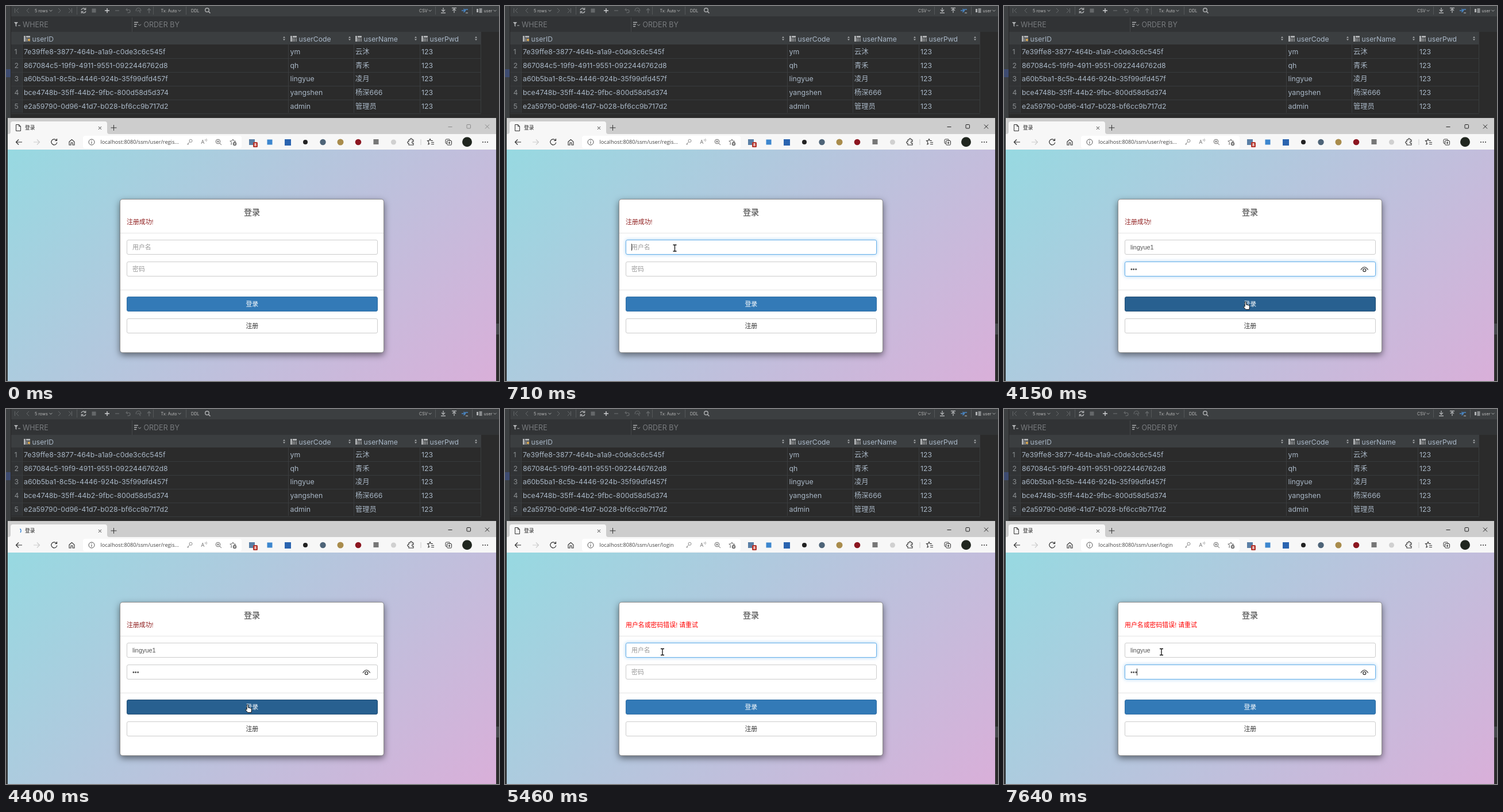
Animation of 858 by 653 pixels, one loop 8 s. Source, as an HTML page:

```html
<!DOCTYPE html>
<html lang="zh">
<head>
<meta charset="utf-8">
<title>登录</title>
<style>
  html, body { margin: 0; width: 858px; height: 653px; overflow: hidden; background: #2b2b2b; }
  body { position: relative; }
  div, svg { position: absolute; box-sizing: border-box; }
  #page { left: 3px; top: 250px; width: 850px; height: 403px; background: linear-gradient(135deg, #97d9e1, #d9afd9); }
  #modal { left: 198px; top: 336px; width: 460px; height: 268px; background: #fff; border: 1px solid rgba(0,0,0,.45); border-radius: 5px; box-shadow: 0 4px 12px rgba(0,0,0,.5); }
  .box { left: 210px; width: 437px; height: 26px; border: 1px solid #ccc; border-radius: 3px; background: #fff; }
  #name { top: 407px; }
  #pass { top: 445px; }
  #login { top: 506px; }
  #reg { top: 544px; }
  .ide { font-family: Inter, "Noto Sans CJK SC", "Noto Sans CJK", sans-serif; }
  .ui { font-family: "Open Sans", "Noto Sans CJK SC", "Noto Sans CJK", sans-serif; }
  .web { font-family: "Liberation Sans", "Noto Sans CJK SC", "Noto Sans CJK", sans-serif; }
  text { white-space: pre; }
</style>
</head>
<body>
<svg id="back" width="858" height="653"></svg>
<div id="page"></div>
<div id="modal"></div>
<div class="box" id="name"></div>
<div class="box" id="pass"></div>
<div class="box" id="login"></div>
<div class="box" id="reg"></div>
<svg id="front" width="858" height="653"></svg>
<script>
const LOOP = 8000;
const $ = id => document.getElementById(id);

const rect = (x, y, w, h, fill, extra = '') =>
  `<rect x="${x}" y="${y}" width="${w}" height="${h}" fill="${fill}" ${extra}/>`;
const dot = (x, y, r, fill) => `<circle cx="${x}" cy="${y}" r="${r}" fill="${fill}"/>`;
const line = (d, color, width = 1, extra = '') =>
  `<path d="${d}" fill="none" stroke="${color}" stroke-width="${width}" ${extra}/>`;
// yc is the vertical middle of the letters
const text = (x, yc, str, size, fill, font, extra = '') =>
  `<text x="${x}" y="${yc + size * .37}" font-size="${size}" fill="${fill}" class="${font}" ${extra}>${str}</text>`;
const chevron = (x, y, color) => line(`M${x - 2.5} ${y - 1.2}l2.5 2.5l2.5-2.5`, color, .9);

function ide() {
  const soft = '#afb1b3', dim = '#65686a', ink = '#a9b7c6';
  let s = rect(0, 0, 858, 195, '#2b2b2b') + rect(0, 0, 858, 18, '#3c3f41')
    + rect(9, 18, 849, 27, '#313335') + rect(9, 45, 818, 22, '#3b3e40') + rect(9, 67, 19, 119, '#313335')
    + rect(0, 0, 8, 653, '#3c3f41') + rect(0, 110, 8, 14, '#3d4b70') + rect(8, 0, 1, 195, '#292929')
    + rect(0, 195, 3, 458, '#35383a') + rect(853, 195, 5, 458, '#2b2b2b') + rect(853, 553, 5, 19, '#45484b');

  s += line('M15.5 4v8M22 4l-4 4l4 4M40 4l-4 4l4 4', dim) + line('M91 4l4 4l-4 4M109 4l4 4l-4 4M114.5 4v8', dim)
    + line('M131 7a4 4 0 0 1 7-1.5M139 9a4 4 0 0 1-7 1.5', soft, 1.4)
    + line('M138.8 3v3.4h-3.4M131.2 13v-3.4h3.4', soft, 1.1)
    + rect(149.5, 4.5, 7, 7, dim) + line('M172 8h8M176 4v8', '#d0d2d4', 1.4) + line('M190 8h7', dim, 1.3)
    + line('M211 4l-2 2.5l3 2M209.5 6.5h4a2.6 2.6 0 0 1 0 5.2h-2', dim, 1.2)
    + line('M226.5 9a4.2 4.2 0 1 1 8 0M229 9.5a2 2 0 1 1 4 0M232 9l2 3', dim, 1.2)
    + line('M249 12.500v-8M246 7.500l3-3l3 3', dim, 1.4)
    + line('M123.500 1v14M256.500 1v14M313.500 1v14M747.500 1v14M811.500 1v14', '#555859')
    + `<circle cx="350" cy="7" r="3.300" fill="none" stroke="${soft}" stroke-width="1.400"/>` + line('M352.500 9.500l3 3', soft, 1.5)
    + line('M761 3v6M758 6.500l3 3l3-3M757 12h8', soft, 1.3) + line('M780 12v-6M777 8l3-3l3 3M776 3.500h8', soft, 1.3)
    + line('M793 8h6M796.500 5l3 3l-3 3M804 6h-5', '#4a88c7', 1.5) + line('M800 12h4', soft, 1.2)
    + rect(819, 5, 3, 6, soft) + rect(823.500, 4, 5, 8, '#8a8d8f');
  [['5 rows', 50], ['Tx: Auto', 269.5], ['DDL', 322], ['CSV', 719], ['user', 831.5]]
    .forEach(([w, x]) => s += text(x, 8, w, 7.2, '#bbb', 'ide'));
  [78, 302, 738, 851].forEach(x => s += chevron(x, 8, soft));

  s += `<path d="M14 28h7l-2.700 3.500v4.500l-1.700-1v-3.500z" fill="${soft}"/>` + line('M21 34h4', soft, 1)
    + line('M223 28.500h7M223 32h5M223 35.500h4', soft, 1.3) + chevron(232.5, 33, soft) + rect(219, 20, 1, 25, '#454849')
    + text(29, 32.3, 'WHERE', 12.5, '#787b7e', 'ide') + text(239.5, 32.3, 'ORDER BY', 12.5, '#787b7e', 'ide');

  [['userID', 31, 484], ['userCode', 495, 598], ['userName', 608, 713], ['userPwd', 723, 818]].forEach(([w, x, sort], i) => {
    s += rect(x, 52, 3, 10, soft) + rect(x + 4, 52, 7, 3, soft)
      + line(`M${x + 4.5} 56v6M${x + 7} 56v6M${x + 10} 56v6`, soft, 1.2);
    if (!i) s += dot(x + 9, 59, 2, '#d9a343');
    s += text(x + 14.5, 57, w, 12.2, ink, 'ide')
      + `<path d="M${sort - 2} 55.500l2-2.500l2 2.500zM${sort - 2} 57.500l2 2.500l2-2.500z" fill="${soft}"/>`;
  });
  const rows = [
    ['7e39ffe8-3877-464b-a1a9-c0de3c6c545f', 'ym', '云沐'],
    ['867084c5-19f9-4911-9551-0922446762d8', 'qh', '青禾'],
    ['a60b5ba1-8c5b-4446-924b-35f99dfd457f', 'lingyue', '凌月'],
    ['bce4748b-35ff-44b2-9fbc-800d58d5d374', 'yangshen', '杨深666'],
    ['e2a59790-0d96-41d7-b028-bf6cc9b717d2', 'admin', '管理员']
  ];
  rows.forEach((row, i) => {
    const y = 79.3 + i * 23.8;
    s += rect(9, Math.round(y + 12), 818, 1, '#383b3d') + text(14.5, y, i + 1, 12.3, '#8b8f92', 'ide');
    [...row, '123'].forEach((w, k) => s += text([31, 494.5, 608, 723][k], y, w, 12.3, ink, 'ide'));
  });
  [28, 491, 605, 720, 826].forEach(x => s += rect(x, 46, 1, 140, '#3a3d3f'));
  return s;
}

function browser() {
  const k = '#333', g = '#888';
  let s = rect(3, 195, 850, 28, '#cdcdcd') + rect(3, 223, 850, 27, '#f7f7f7')
    + `<path d="M4 223q4 0 4-4v-14q0-4 4-4h160q4 0 4 4v14q0 4 4 4z" fill="#f7f7f7"/>`
    + rect(134, 226, 276, 22, '#fff', 'rx="4"')
    + text(33, 212, '登录', 8.7, '#222', 'ui')
    + line('M161 210l5 5M166 210l-5 5', k) + line('M182.500 212h10M187.500 207v10', k)
    + line('M28 237h-10.500M22 232.500l-4.500 4.500l4.500 4.500', k, 1.2)
    + line('M48 237h10.500M54 232.500l4.500 4.500l-4.500 4.500', '#ccc', 1.2)
    + line('M88 234a5 5 0 1 0 .8 3.500M88.500 231v3.500h-3.500', k, 1.2)
    + line('M110 236.500l4.500-4l4.500 4v5.500h-3v-4h-3v4h-3z', k, 1.1)
    + `<circle cx="149" cy="237" r="5" fill="none" stroke="#555"/>` + line('M149 236v4M149 233.700v1.200', '#555')
    + `<g id="key">` + `<circle cx="321.500" cy="234.800" r="2.500" fill="none" stroke="${g}"/>` + line('M319.700 236.700l-4.200 4.200h2v-1.500', g) + '</g>'
    + text(339.5, 237, 'A', 9, '#666', 'ui') + line('M346.500 232q1.500 1.500 0 3M348.500 231q2.200 2.500 0 5', g, .8)
    + `<circle cx="369" cy="236" r="3.800" fill="none" stroke="#666"/>` + line('M372 239l3 3M367 236h4M369 234v4', '#666')
    + line('M395 232l1.400 3l3.400.4l-2.500 2M393 240.500l-1.200.7l.7-3.700l-2.700-2.300l3.600-.5l1.600-2.700', '#666')
    + dot(398, 240, 3.2, '#666') + line('M396 240h4M398 238v4', '#fff', .8);

  s += rect(423, 232, 10, 10, '#5a7fa5') + rect(430, 237, 8, 9, '#b5342b', 'rx="1.500"')
    + text(434, 241.7, '8', 7, '#fff', 'ui', 'text-anchor="middle" font-weight="700"')
    + rect(454.5, 232.5, 9, 9, '#3d87cf') + rect(485, 232, 11, 11, '#2a64b0') + dot(521, 237, 4, '#222')
    + dot(551.5, 237, 5.2, '#4e6478') + dot(582, 237, 5.5, '#a98c4c') + dot(613, 237, 5.3, '#8c1620')
    + rect(639.5, 232, 9, 9, '#777') + dot(674.5, 237, 4.5, '#d0d0d0')
    + line('M701 233h2.500a1.700 1.700 0 1 1 3 0h2.500v3a1.700 1.700 0 1 0 0 3v3h-8v-2.800a1.700 1.700 0 1 1 0-3.200z', k, 1.1)
    + rect(721.5, 232, 1, 10, '#ccc')
    + line('M743 234.500h-3.500l-1.500-3l-1.500 3h-3l2.300 2.500l-.8 4l2.500-1.500M740 237.500h5M740 240.500h5', k, 1.1)
    + `<rect x="765" y="232" width="7.500" height="7.500" rx="1.500" fill="none" stroke="#333"/><rect x="767.500" y="234.500" width="8" height="7.500" rx="1.500" fill="#f7f7f7" stroke="#333"/>`
    + line('M769.500 238.300h4M771.500 236.300v4', k)
    + dot(802.5, 236.7, 8.5, '#20261f') + dot(830, 237, 1, k) + dot(834, 237, 1, k) + dot(838, 237, 1, k)
    + `<g id="wm" fill="none"><path d="M769.500 210.500h7"/><rect x="802" y="206.500" width="6.500" height="6.500" rx="1"/><path d="M834 206.500l7 7M841 206.500l-7 7"/></g>`
    + `<path id="doc" d="M17.500 206.500h5l3 3v8h-8zM22.500 206.500v3h3" fill="none" stroke="#333"/>`
    + line('M26 212a4.500 4.500 0 0 0-4.500-4.500', '#2b7cd3', 1.5, 'id="spin"')
    + text(164.5, 237, '', 9.2, '#444', 'ui', 'id="url"');
  return s;
}

function form() {
  const mid = 'text-anchor="middle"';
  return text(428, 358.3, '登录', 14.1, '#333', 'web', mid) + text(210, 376, '', 10.9, '#8f1d1d', 'web', 'id="msg"')
    + rect(199, 395, 458, 1, '#e5e5e5') + rect(199, 494, 458, 1, '#e5e5e5')
    + text(220, 420, '', 10.9, '#555', 'web', 'id="nameText"') + text(220, 458, '', 10.9, '#555', 'web', 'id="passText"')
    + text(428.3, 519, '登录', 10.9, '#fff', 'web', mid) + text(428.3, 557, '注册', 10.9, '#333', 'web', mid)
    + `<g id="eye" fill="none" stroke="#222" stroke-width="1.200"><path d="M621 459.500q6.300-9.500 12.600 0"/><circle cx="627.300" cy="460" r="2.500"/></g>`
    + rect(0, 0, 1, 12, '#333', 'id="caret"')
    + `<path id="arrow" d="M0 0v14.500l3.500-2.800l1.800 1l5.900-1.600z" fill="#fff" stroke="#111" stroke-width="1.200" stroke-linejoin="round"/>`
    + `<g id="beam"><path d="M-3-5.500h6M0-5.500v11M-3 5.500h6" fill="none" stroke="#fff" stroke-width="2.600"/><path d="M-3-5.500h2.300l.7.700l.7-.7h2.300M0-5v10M-3 5.500h2.300l.7-.7l.7.700h2.300" fill="none" stroke="#111" stroke-width="1.300"/></g>`
    + `<path id="hand" d="M-1.300 0q1.300-1.200 2.300 0v4.500l4.500 1q1.600.500 1.500 2l-.7 5.500h-6l-4-4.500q.3-2 2.400-.7z" fill="#fff" stroke="#111" stroke-linejoin="round"/>`;
}

$('back').innerHTML = ide() + browser();
$('front').innerHTML = form();

const FOCUS1 = 560, CLICK = 4260, LOADED = 4480, FOCUS2 = 4930;
const NAME1 = [1210, 1370, 1500, 1620, 1850, 2040, 2170, 2490];
const NAME2 = [5590, 5770, 5930, 6030, 6260, 6550, 6680];
const PASS1 = [3110, 3200, 3300], PASS2 = [7420, 7530, 7640];
const MOVES = [
  [30, 800, 660], [540, 295.5, 421.5], [3800, 295.5, 421.5], [4100, 420.5, 515.5],
  [4440, 420.5, 515.5], [4610, 335, 466], [4740, 287, 431], [4900, 274, 423]
];

const count = (times, t) => times.filter(x => t >= x).length;
const clamp = x => Math.max(0, Math.min(1, x));
const smooth = x => x * x * (3 - 2 * x);
const show = (id, on) => $(id).style.display = on ? '' : 'none';

function pointer(t) {
  const i = MOVES.findIndex(m => m[0] > t);
  if (i < 0) return MOVES[MOVES.length - 1].slice(1);
  if (i === 0) return MOVES[0].slice(1);
  const [t0, x0, y0] = MOVES[i - 1], [t1, x1, y1] = MOVES[i];
  const p = smooth((t - t0) / (t1 - t0));
  return [x0 + (x1 - x0) * p, y0 + (y1 - y0) * p];
}

// focus ring fades over 150 ms
function ring(id, t, from, to) {
  const a = smooth(clamp((t - from) / 150)) * (1 - smooth(clamp((t - to) / 150)));
  const mix = (p, q) => Math.round(p + (q - p) * a);
  $(id).style.borderColor = `rgb(${mix(204, 102)},${mix(204, 175)},${mix(204, 233)})`;
  $(id).style.boxShadow = `0 0 6px rgba(102,175,233,${.6 * a})`;
}

function field(id, str, hint) {
  $(id).textContent = str || hint;
  $(id).setAttribute('fill', str ? '#555' : '#999');
  return str ? $(id).getComputedTextLength() : 0;
}

function draw(t) {
  const second = t >= LOADED;
  const word = second ? 'lingyue' : 'lingyue1';
  const typed = count(second ? NAME2 : NAME1, t), dots = count(second ? PASS2 : PASS1, t);
  const passFrom = second ? 7100 : 2800;
  const nameW = field('nameText', word.slice(0, typed), '用户名');
  const passW = field('passText', '•'.repeat(dots), '密码');

  const msg = $('msg');
  msg.textContent = second ? '用户名或密码错误! 请重试' : '注册成功!';
  msg.setAttribute('fill', second ? '#f00' : '#8f1d1d');

  const key = !typed || dots > 0;
  show('key', key);
  $('url').textContent = 'localhost:8080/ssm/user/' + (second ? 'login' : key ? 'regis...' : 'register');
  $('wm').setAttribute('stroke', t < FOCUS1 ? '#8a8a8a' : '#222');
  show('eye', dots > 0);

  ring('name', t, second ? FOCUS2 : FOCUS1, passFrom);
  if (second) ring('pass', t, passFrom, LOOP);
  else ring('pass', t, passFrom, CLICK);

  const inPass = t >= passFrom;
  const caretOn = second
    ? t >= FOCUS2 && (t < 5460 || t >= 5590)
    : t >= FOCUS1 && (t < 1090 || t >= 1210) && t < 3830;
  show('caret', caretOn);
  $('caret').setAttribute('x', Math.round(220 + (inPass ? passW : nameW)));
  $('caret').setAttribute('y', inPass ? 452 : 414);

  const loading = t >= CLICK + 30 && t < LOADED + 60;
  show('doc', !loading);
  show('spin', loading);
  $('spin').setAttribute('transform', `rotate(${t * .5 % 360} 21.500 212)`);

  const [x, y] = pointer(t);
  const over = (a, b) => x > 210 && x < 646 && y > a && y < b;
  const onLogin = over(506, 532), onReg = over(544, 570);
  const kind = onLogin || onReg ? 'hand' : over(408, 430) || over(446, 470) ? 'beam' : 'arrow';
  ['arrow', 'beam', 'hand'].forEach(id => show(id, id === kind && t >= 30));
  $(kind).setAttribute('transform', `translate(${x} ${y})`);

  const pressed = t >= CLICK - 60 && t < CLICK + 30;
  const login = $('login').style, reg = $('reg').style;
  login.background = pressed ? '#204d74' : onLogin ? '#286090' : '#337ab7';
  login.borderColor = onLogin ? '#204d74' : '#2e6da4';
  reg.background = onReg ? '#e6e6e6' : '#fff';
  reg.borderColor = onReg ? '#adadad' : '#ccc';
}

function tick() {
  draw(performance.now() % LOOP);
  requestAnimationFrame(tick);
}
tick();
</script>
</body>
</html>
```
